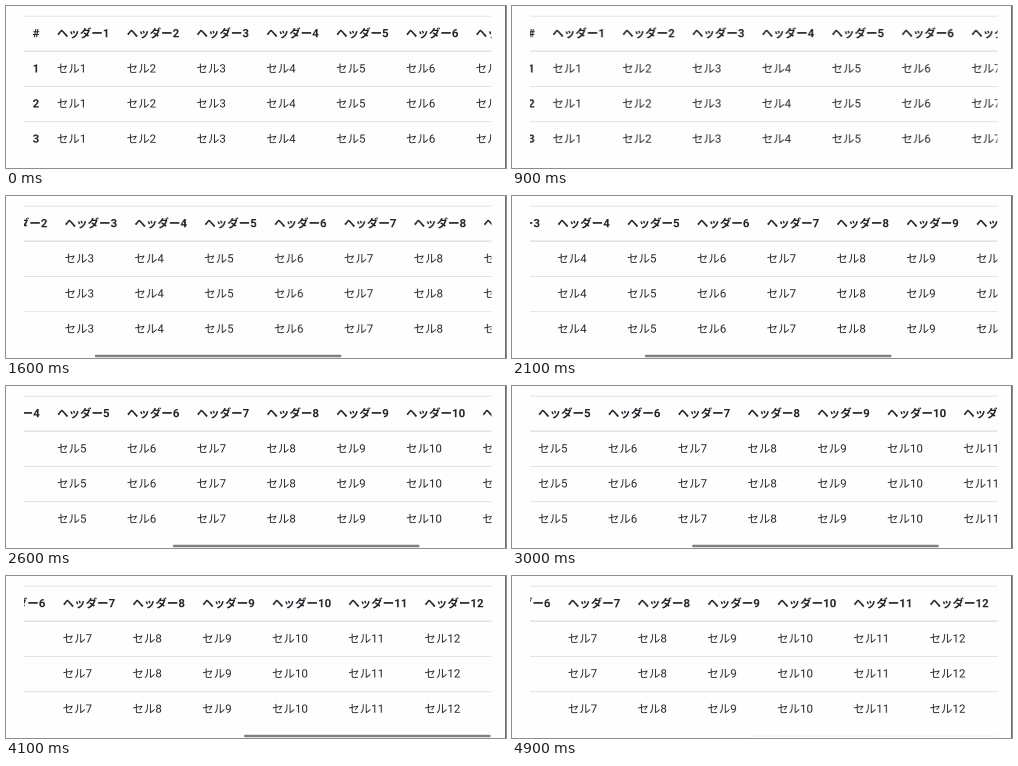
Animation of 500x162 px, one loop 5.5 s. Source, as an HTML page with a canvas:

```html
<!DOCTYPE html>
<html lang="ja">
<head>
<meta charset="utf-8">
<title>Scrolling table</title>
<style>
html, body { margin: 0; width: 100%; height: 100%; overflow: hidden; background: #fefefe; }
canvas { display: block; width: 500px; height: 162px; }
</style>
</head>
<body>
<canvas id="stage"></canvas>
<script>
const W = 500, H = 162, LOOP = 5500, STEP = 100, FINE = 4;
const VIEW = { x: 18, w: 467.5 };
const PAD = 8.6, COLS = 12, FIRST = 24.2, COL = 69.8, WIDE = 76.2;
const FAMILY = "Roboto, 'Noto Sans CJK JP', 'Noto Sans CJK', sans-serif";
const TOTAL = FIRST + 9 * COL + 3 * WIDE;

// [time, scroll offset] of the two swipes
const KEYS = [[800, 0], [900, 10.5], [1600, 131.8], [2100, 215], [2600, 279],
  [3000, 304], [3200, 304], [3600, 380.2], [3800, 403], [4200, 413.9]];

const canvas = document.getElementById('stage');
const ctx = canvas.getContext('2d');
const dpr = window.devicePixelRatio || 1;
canvas.width = W * dpr;
canvas.height = H * dpr;

const slope = i => (KEYS[i + 1][1] - KEYS[i][1]) / (KEYS[i + 1][0] - KEYS[i][0]);

function tangent(i) {
  if (i === 0 || i === KEYS.length - 1) return 0;
  const a = slope(i - 1), b = slope(i);
  return a * b > 0 ? 2 * a * b / (a + b) : 0;
}

// monotone cubic through the keys
function scrollAt(t) {
  const last = KEYS.length - 1;
  if (t <= KEYS[0][0]) return 0;
  if (t >= KEYS[last][0]) return KEYS[last][1];
  let i = 0;
  while (t >= KEYS[i + 1][0]) i++;
  const [t0, y0] = KEYS[i], [t1, y1] = KEYS[i + 1];
  const d = t1 - t0, u = (t - t0) / d, v = 1 - u;
  return y0 * (1 + 2 * u) * v * v + y1 * u * u * (3 - 2 * u)
    + d * u * v * (tangent(i) * v - tangent(i + 1) * u);
}

function barAlpha(t) {
  if (t < 1000) return 0;
  if (t < 4800) return 1;
  return t < 4900 ? 0.5 : 0.06;
}

function rule(y, h) {
  ctx.fillStyle = '#dee2e6';
  ctx.fillRect(VIEW.x, y, VIEW.w, h);
}

function row(g, y, head, label, cell, bold) {
  const font = weight => { g.font = `${weight} 11.5px ${FAMILY}`; };
  font(700);
  g.fillText(label, PAD, y);
  font(bold ? 700 : 400);
  let x = FIRST;
  for (let i = 1; i <= COLS; i++) {
    g.fillText(cell + i, x + PAD, y);
    x += i < 10 ? COL : WIDE;
  }
}

// whole table text, drawn finely so it can slide by part pixels
function makeSheet() {
  const sheet = document.createElement('canvas');
  sheet.width = Math.ceil(TOTAL) * FINE;
  sheet.height = H * FINE;
  const g = sheet.getContext('2d');
  g.scale(FINE, FINE);
  g.fillStyle = '#212529';
  row(g, 31.2, 0, '#', 'ヘッダー', true);
  for (let n = 1; n <= 3; n++) row(g, 31.5 + n * 35.05, 0, n, 'セル', false);
  return sheet;
}

const sheet = makeSheet();

function draw(time) {
  const t = Math.floor((time % LOOP) / STEP) * STEP;
  const offset = scrollAt(t);
  ctx.setTransform(dpr, 0, 0, dpr, 0, 0);
  ctx.fillStyle = '#fefefe';
  ctx.fillRect(0, 0, W, H);
  ctx.fillStyle = '#6e6e6e';
  ctx.fillRect(W - 1, 0, 1, H);

  rule(9.7, 0.9);
  rule(44.5, 1.4);
  rule(80.1, 0.9);
  rule(115.2, 0.9);

  ctx.save();
  ctx.beginPath();
  ctx.rect(VIEW.x, 0, VIEW.w, H);
  ctx.clip();
  ctx.imageSmoothingQuality = 'high';
  ctx.drawImage(sheet, VIEW.x - offset, 0, sheet.width / FINE, H);
  ctx.restore();

  const ratio = VIEW.w / TOTAL;
  ctx.globalAlpha = barAlpha(t);
  ctx.fillStyle = '#808080';
  ctx.beginPath();
  ctx.roundRect(VIEW.x + 0.8 + offset * ratio, 158.8, VIEW.w * ratio - 1.4, 2.5, 1.2);
  ctx.fill();
  ctx.globalAlpha = 1;
}

const start = performance.now();
function tick() {
  draw(performance.now() - start);
  requestAnimationFrame(tick);
}
tick();
</script>
</body>
</html>
```
